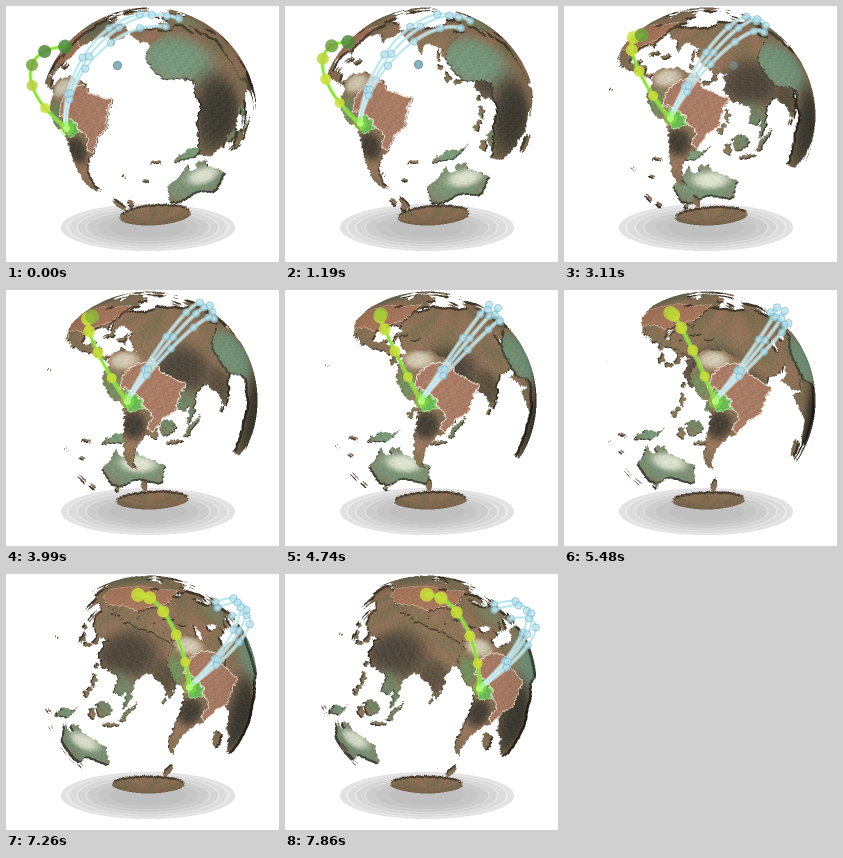
Write a matplotlib script that moves like this. It is 273 px wide and 256 px high and loops after 8000 ms.

```python
import numpy as np
import matplotlib.pyplot as plt
from matplotlib.animation import FuncAnimation
from matplotlib.path import Path

W, H, DPI = 273, 256, 100
FRAMES, STEP = 50, 160
CX, CY, R = 142.5, 110.5, 109
TILT = np.radians(-16)
SS = 2                     # supersampling of the globe
TW, TH = 1080, 540         # land map size

# ---------- coastlines (lon, lat) ----------
north_america = [
    (-168, 66), (-156, 71), (-128, 70), (-110, 68), (-95, 68), (-93, 72), (-82, 68),
    (-87, 64), (-94, 60), (-92, 57), (-82, 55), (-80, 51), (-78, 56), (-77, 62),
    (-70, 61), (-65, 59), (-56, 53), (-60, 50), (-66, 50), (-61, 46), (-66, 44),
    (-70, 43), (-74, 40), (-76, 35), (-81, 31), (-80, 26), (-84, 30), (-90, 29),
    (-97, 27), (-97, 21), (-94, 18), (-91, 19), (-87, 21), (-88, 16), (-83, 15),
    (-83, 10), (-78, 9), (-80, 7), (-85, 10), (-92, 14), (-97, 16), (-105, 20),
    (-109, 25), (-113, 31), (-110, 23), (-115, 29), (-118, 34), (-124, 40),
    (-124, 48), (-132, 55), (-140, 60), (-150, 60), (-160, 56), (-158, 59), (-165, 61)]
greenland = [(-73, 78), (-60, 82), (-32, 83), (-20, 80), (-20, 72), (-32, 68),
             (-43, 60), (-51, 64), (-55, 70), (-60, 76)]
baffin = [(-62, 66), (-65, 62), (-78, 65), (-73, 68), (-88, 71), (-82, 74), (-70, 71)]
south_america = [
    (-78, 9), (-72, 12), (-62, 11), (-52, 5), (-50, 0), (-44, -3), (-35, -6),
    (-39, -13), (-40, -21), (-48, -26), (-54, -34), (-58, -35), (-62, -39),
    (-65, -42), (-67, -46), (-69, -51), (-66, -55), (-72, -53), (-75, -47),
    (-73, -38), (-71, -30), (-70, -18), (-76, -14), (-81, -5), (-80, 1), (-77, 4)]
africa = [
    (-17, 15), (-17, 21), (-10, 30), (-6, 35), (10, 37), (11, 33), (20, 31), (32, 31),
    (37, 22), (43, 12), (51, 12), (47, 4), (40, -4), (40, -15), (35, -20), (35, -24),
    (31, -29), (26, -34), (18, -34), (12, -18), (13, -8), (9, -1), (9, 4), (4, 6),
    (-8, 4), (-13, 9)]
europe = [
    (-9, 37), (-9, 43), (-2, 43), (-1, 47), (-4, 48), (4, 52), (9, 54), (9, 57),
    (11, 54), (20, 55), (24, 59), (29, 60), (22, 61), (25, 65), (17, 61), (16, 56),
    (11, 58), (6, 59), (6, 62), (15, 68), (25, 71), (40, 67), (45, 68), (62, 69),
    (62, 25), (57, 26), (50, 30), (52, 24), (59, 22), (52, 16), (43, 13), (35, 28),
    (36, 36), (27, 37), (28, 41), (23, 38), (19, 42), (13, 45), (18, 40), (16, 38),
    (9, 44), (3, 43), (-1, 37)]
asia = [
    (61, 69), (70, 73), (82, 73), (104, 77), (113, 74), (130, 71), (150, 71), (170, 70),
    (180, 69), (190, 66), (180, 63), (172, 60), (163, 60), (162, 56), (157, 51),
    (156, 58), (150, 59), (138, 55), (141, 52), (135, 44), (128, 41), (129, 35),
    (126, 35), (125, 40), (121, 40), (118, 38), (122, 37), (119, 34), (122, 30),
    (118, 24), (110, 21), (106, 19), (109, 12), (105, 9), (101, 13), (103, 2), (98, 9),
    (97, 17), (91, 22), (87, 21), (80, 15), (80, 10), (77, 8), (73, 17), (72, 21),
    (67, 25), (61, 25)]
australia = [
    (114, -22), (122, -18), (129, -15), (132, -11), (137, -12), (136, -15), (140, -17),
    (142, -11), (146, -19), (153, -26), (150, -37), (145, -39), (140, -37), (136, -34),
    (131, -31), (124, -33), (116, -35)]
new_guinea = [(131, -1), (135, -3), (141, -3), (147, -6), (150, -10), (144, -8), (138, -8)]
sumatra = [(95, 6), (99, 3), (106, -5), (102, -4)]
madagascar = [(49, -13), (50, -16), (47, -25), (44, -24), (44, -17)]
brazil = [
    (-60, 5), (-51, 4), (-50, 0), (-44, -3), (-35, -6), (-39, -13), (-40, -21),
    (-48, -26), (-53, -33), (-57, -30), (-54, -25), (-58, -20), (-60, -15),
    (-65, -11), (-72, -9), (-70, -3), (-67, 1)]
bolivia = [(-69, -11), (-65, -10), (-60, -15), (-58, -20), (-63, -22), (-68, -22), (-69, -17)]
usa = [(-124, 48), (-95, 49), (-83, 45), (-68, 46), (-76, 35), (-81, 31), (-90, 29),
       (-97, 26), (-106, 31), (-117, 32), (-124, 40)]

# lon, lat, half width, half height
islands = [
    (-2, 54, 2.5, 4), (-8, 53, 1.6, 1.6), (-19, 65, 4, 1.6), (133, 34, 3, 1.3),
    (139, 37, 2, 3), (143, 43, 2, 1.6), (143, 50, 1, 4), (121, 24, .8, 1.6),
    (121, 16, 1.5, 3), (123, 11, 2, 1), (125, 8, 2, 2), (114, 1, 4.5, 4.5),
    (110, -7, 5, 1), (121, -2, 1.5, 3.5), (-79, 22, 4, .8), (-71, 19, 2.5, 1),
    (176, -39, 2, 3), (170, -44, 2.3, 2.3), (147, -42, 1.5, 1.4), (81, 7, 1, 1.7),
    (-156, 20, 1, .8), (178, -18, 1, .8), (165, -21, 1.6, .8), (160, -9, 2.5, .8),
    (-112, 71, 7, 2), (-85, 79, 12, 3), (-62, -68, 4, 5), (55, 74, 4, 3)]
seas = [(35, 43, 6, 2), (51, 42, 2.2, 5), (-86, 45, 4, 1.5)]

# lon, lat, half width, half height, colour
tints = [
    (0, 17, 24, 16, (118, 150, 124)), (25, -10, 17, 22, (62, 60, 50)),
    (15, 50, 15, 9, (130, 130, 100)), (103, 32, 22, 14, (78, 70, 60)),
    (79, 20, 9, 10, (92, 80, 64)), (108, 8, 14, 14, (110, 130, 100)),
    (133, -25, 26, 16, (124, 148, 120)), (130, -21, 11, 6, (220, 225, 206)),
    (141, -5, 9, 5, (120, 150, 118)), (-65, -29, 8, 8, (68, 62, 52)),
    (-76, -8, 6, 8, (112, 138, 90)), (-69, 6, 8, 5, (205, 198, 174)),
    (-100, 61, 36, 9, (112, 110, 84))]

lon, lat = np.meshgrid((np.arange(TW) + .5) * 360 / TW - 180,
                       90 - (np.arange(TH) + .5) * 180 / TH)


def wave(a, b, k):
    return np.sin(a * k + 2 * np.sin(b * k * .7)) * np.cos(b * k * 1.2 + a * k * .4)


# ragged coast: look the outlines up at slightly shifted places
jlon = lon + .8 * wave(lon, lat, .9) + .5 * wave(lat, lon, 2.1)
jlat = lat + .7 * wave(lat, lon, .8) + .4 * wave(lon, lat, 2.3)
points = np.column_stack([jlon.ravel(), jlat.ravel()])


def inside(poly, shift=0):
    outline = np.array(poly, float) + (shift, 0)
    return Path(outline).contains_points(points).reshape(lon.shape)


def oval(x, y, rx, ry):
    return ((jlon - x) / rx) ** 2 + ((jlat - y) / ry) ** 2 < 1


def edge(mask):
    out = np.zeros_like(mask)
    for axis in (0, 1):
        out |= mask & ~np.roll(mask, 2, axis)
        out |= mask & ~np.roll(mask, -2, axis)
    return out


def make_land():
    land = jlat < -71 + 4 * np.sin(np.radians(lon))
    for poly in (north_america, greenland, baffin, south_america, africa, europe,
                 asia, australia, new_guinea, sumatra, madagascar):
        land |= inside(poly)
    land |= inside(asia, -360)
    for isle in islands:
        land |= oval(*isle)
    for sea in seas:
        land &= ~oval(*sea)
    return land


def make_colours():
    mix = (.5 + .5 * wave(lon, lat, .13))[..., None]
    tex = mix * np.array([150, 117, 92.]) + (1 - mix) * np.array([126, 112, 82.])
    for x, y, rx, ry, col in tints:
        d = ((lon - x) / rx) ** 2 + ((lat - y) / ry) ** 2
        w = np.exp(-np.minimum(d, 20) ** 2)[..., None]
        tex = tex * (1 - w) + w * np.array(col)
    for poly, col, rim in ((usa, (168, 120, 92), (205, 175, 150)),
                           (brazil, (164, 120, 98), (226, 208, 194)),
                           (bolivia, (104, 178, 84), (150, 205, 130))):
        m = inside(poly)
        tex[m] = col
        tex[edge(m)] = rim
    grain = wave(lon, lat, 1.7) + wave(lat, lon, 2.9)
    return np.clip(tex + 7 * grain[..., None], 0, 255)


land = make_land()
colours = make_colours()

# ---------- pixel geometry ----------
px, py = np.meshgrid((np.arange(W * SS) + .5) / SS, (np.arange(H * SS) + .5) / SS)


def shell(radius, side, dim):
    """Rows and longitudes seen on one half of a sphere, with its brightness."""
    x, y = (px - CX) / (R * radius), (CY - py) / (R * radius)
    hit = x ** 2 + y ** 2 < 1
    x, y = x[hit], y[hit]
    depth = np.sqrt(1 - x ** 2 - y ** 2)
    z = side * depth
    phi = np.arcsin(np.clip(y * np.cos(TILT) + z * np.sin(TILT), -1, 1))
    lam = np.degrees(np.arctan2(x, z * np.cos(TILT) - y * np.sin(TILT)))
    row = np.clip(((90 - np.degrees(phi)) * TH / 180).astype(int), 0, TH - 1)
    light = dim * (.78 + .26 * np.sqrt(depth))
    return np.flatnonzero(hit), row, lam, light[:, None]


# far to near
shells = [shell(1, -1, .5), shell(.975, -1, 1), shell(.975, 1, .55), shell(1, 1, 1)]


def floor_shadow():
    img = np.full((H * SS, W * SS, 3), 255.)
    d = np.hypot(px - 142, (py - 221.5) / .27)
    for rx, grey in ((87, 226), (81, 236), (79, 220), (72, 230), (70, 213),
                     (63, 222), (61, 205), (50, 198), (38, 192)):
        img[d < rx] = grey
    return img


backdrop = floor_shadow()


def globe(centre):
    img = backdrop.copy().reshape(-1, 3)
    for idx, row, lam, light in shells:
        col = ((lam + centre + 180) % 360 * TW / 360).astype(int) % TW
        on = land[row, col]
        img[idx[on]] = np.clip(colours[row[on], col[on]] * light[on], 0, 255)
    img = img.reshape(H, SS, W, SS, 3).mean(axis=(1, 3))
    return img.astype(np.uint8)


# ---------- arcs ----------
def unit(lo, la):
    lo, la = np.radians(lo), np.radians(la)
    return np.array([np.cos(la) * np.sin(lo), np.sin(la), np.cos(la) * np.cos(lo)])


def arc(a, b, s, lift):
    a, b = unit(*a), unit(*b)
    w = np.arccos(a @ b)
    s = np.asarray(s)[:, None]
    p = (np.sin((1 - s) * w) * a + np.sin(s * w) * b) / np.sin(w)
    return p * (1 + lift * np.sin(np.pi * s))


def project(p, centre):
    c = np.radians(centre)
    x = p[:, 0] * np.cos(c) - p[:, 2] * np.sin(c)
    q = p[:, 0] * np.sin(c) + p[:, 2] * np.cos(c)
    y = p[:, 1] * np.cos(TILT) - q * np.sin(TILT)
    z = p[:, 1] * np.sin(TILT) + q * np.cos(TILT)
    return CX + R * x, CY - R * y, z


HUB = (-68, -16)
path = np.linspace(0, 1, 50)
beads = np.arange(1, 6) / 5
green_path = arc(HUB, (-98, 39.5), path, .22)
green_beads = arc(HUB, (-98, 39.5), beads, .22)
blue_ends = [(-4, 40), (0, 52), (10, 50)]
blue_paths = [arc(HUB, e, path, .19) for e in blue_ends]
blue_beads = [arc(HUB, e, beads, .19) for e in blue_ends]
hub = unit(*HUB)[None]
buoy = unit(-33, 13)[None]

PT = 72 / DPI
fig = plt.figure(figsize=(W / DPI, H / DPI), dpi=DPI, facecolor="white")
ax = fig.add_axes([0, 0, 1, 1])
ax.axis("off")
picture = ax.imshow(np.full((H, W, 3), 255, np.uint8), extent=(0, W, H, 0),
                    interpolation="nearest", aspect="auto")


def line(col, width, alpha):
    return ax.plot([], [], color=col, lw=width * PT, alpha=alpha,
                   solid_capstyle="round")[0]


def spots(count, size, **style):
    area = np.broadcast_to((np.asarray(size) * PT) ** 2, count)
    return ax.scatter(np.zeros(count), np.zeros(count), s=area, zorder=2, **style)


blue_lines = [(line("white", 4.5, .45), line("#b4e6ee", 2.2, .9)) for _ in blue_ends]
blue_dots = [spots(5, 7, facecolor=(.70, .88, .93, .6), edgecolor=(.50, .74, .82, .75),
                   lw=PT) for _ in blue_ends]
green_lines = (line("#c8f58c", 5, .45), line("#84e62c", 2.4, 1))
green_dots = spots(5, 9 + 5 * beads, lw=0)
hub_dots = (spots(1, 14, color="#8cf03c", alpha=.45, lw=0),
            spots(1, 7, color="#b4ff78", alpha=.9, lw=0))
buoy_dot = spots(1, 8, facecolor="#88b0c2", edgecolor="#6c98ac", lw=PT)
ax.set_xlim(0, W)
ax.set_ylim(H, 0)

DARK, BRIGHT = np.array([.30, .54, .24]), np.array([.80, .88, .22])


def place(dots, p, centre):
    x, y, z = project(p, centre)
    dots.set_offsets(np.column_stack([x, y]))
    return z


def trace(lines, p, centre):
    x, y, _ = project(p, centre)
    for ln in lines:
        ln.set_data(x, y)


def draw(i):
    t = i * STEP / 1000
    centre = -16 - 10.4 * t
    picture.set_data(globe(centre))

    for lines, dots, p, b in zip(blue_lines, blue_dots, blue_paths, blue_beads):
        trace(lines, p, centre)
        place(dots, b, centre)

    # beads turn from dark green to yellow as they come to the front
    trace(green_lines, green_path, centre)
    z = place(green_dots, green_beads, centre)
    m = np.clip((z - .2) / .35, 0, 1)[:, None]
    rgb = DARK * (1 - m) + BRIGHT * m
    green_dots.set_facecolor(np.column_stack([rgb, np.full(len(rgb), .85)]))

    for dot in hub_dots:
        place(dot, hub, centre)
    place(buoy_dot, buoy, centre)
    buoy_dot.set_alpha(float(np.clip(3.4 - t, 0, 1)))
    return []


anim = FuncAnimation(fig, draw, frames=FRAMES, interval=STEP, repeat=True,
                     repeat_delay=0, init_func=lambda: draw(0))
plt.show()
```
